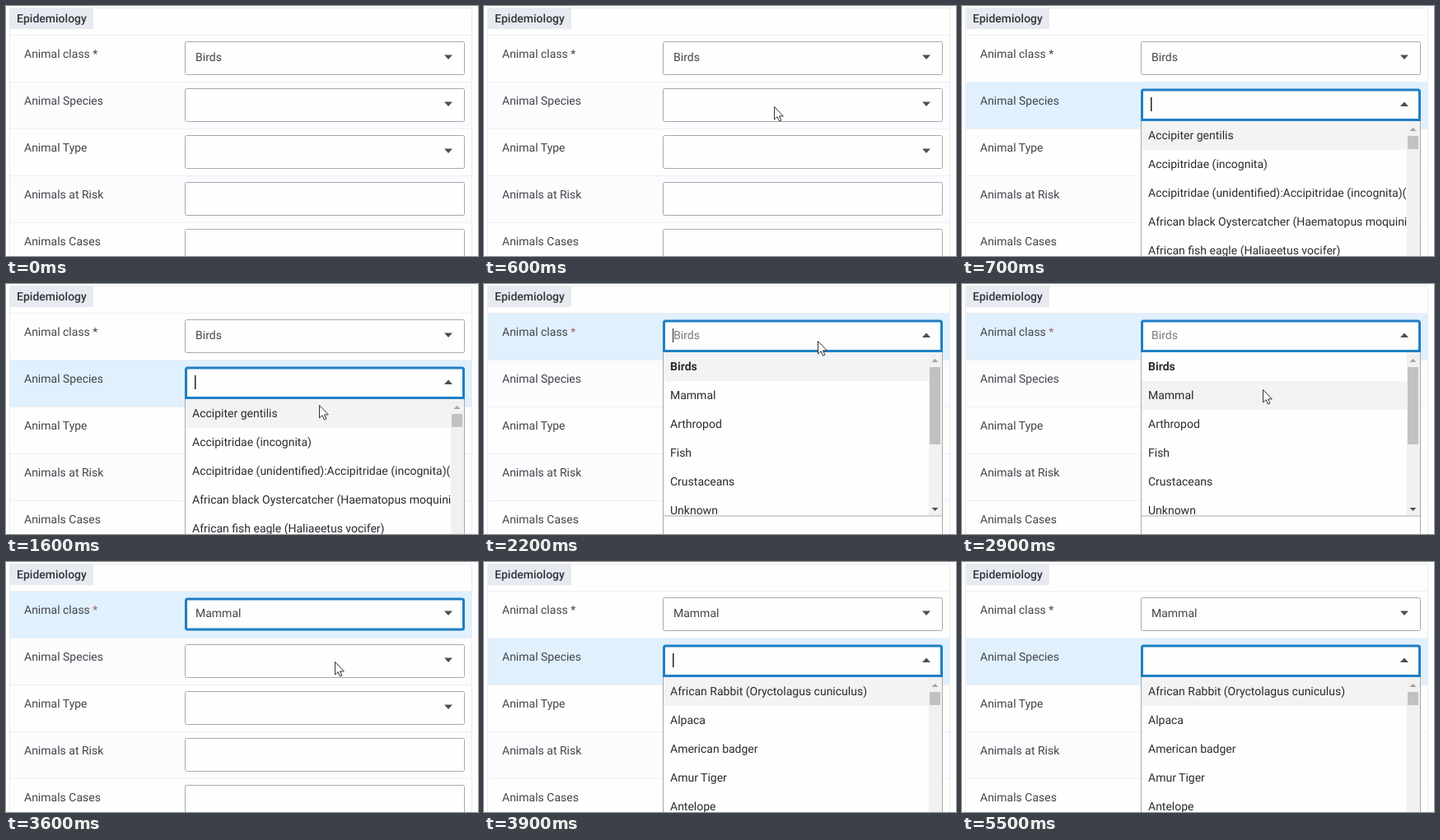
An HTML page that plays this animation: 573x304 px, repeating every 5600 ms.

```html
<!DOCTYPE html>
<html lang="en">
<head>
<meta charset="utf-8">
<title>Epidemiology form</title>
<style>
  html, body { margin: 0; width: 100%; height: 100%; overflow: hidden; background: #fefefe; }
  svg { display: block; width: 573px; height: 304px; font: 14px Roboto, sans-serif; fill: #434449;
    text-rendering: geometricPrecision; }
</style>
</head>
<body>
<svg id="stage" viewBox="0 0 573 304"></svg>
<script>
const LOOP = 5600, STEP = 100;
const ROW_TOP = 35, ROW_HEIGHT = 57, OPTION_HEIGHT = 35;
const LABELS = ['Animal class', 'Animal Species', 'Animal Type', 'Animals at Risk', 'Animals Cases'];
const CLASSES = ['Birds', 'Mammal', 'Arthropod', 'Fish', 'Crustaceans', 'Unknown'];
const BIRDS = ['Accipiter gentilis', 'Accipitridae (incognita)',
  'Accipitridae (unidentified):Accipitridae (incognita)(unidentified)',
  'African black Oystercatcher (Haematopus moquini)', 'African fish eagle (Haliaeetus vocifer)'];
const MAMMALS = ['African Rabbit (Oryctolagus cuniculus)', 'Alpaca', 'American badger', 'Amur Tiger', 'Antelope'];

// Form states: start time, focused row, open list, caret blink times
const STATES = [
  { at: 0, value: 'Birds', focus: -1 },
  { at: 700, value: 'Birds', focus: 1, options: BIRDS, blinks: [1100, 1600] },
  { at: 2200, value: 'Birds', focus: 0, options: CLASSES, blinks: [2700] },
  { at: 3100, value: 'Mammal', focus: 0 },
  { at: 3900, value: 'Mammal', focus: 1, options: MAMMALS, blinks: [4400, 4900, 5500] }
];

// Pointer strokes as [time, x, y] points; the pointer is hidden between strokes
const STROKES = [
  [[100, 300, 250], [600, 352, 122], [700, 352, 122]],
  [[1300, 376, 141], [1400, 380, 147], [1800, 380, 147]],
  [[1900, 396, 96], [2000, 404, 72], [2200, 405, 69], [2300, 405, 67], [2400, 403, 70],
   [2500, 403, 70], [2900, 365, 128], [3000, 365, 128], [3600, 399, 121], [3900, 399, 121]]
];

const rect = (x, y, w, h, fill, extra = '') =>
  `<rect x="${x}" y="${y}" width="${w}" height="${h}" fill="${fill}" ${extra}/>`;
const text = (x, y, content, extra = '') => `<text x="${x}" y="${y}" ${extra}>${content}</text>`;
const triangle = (x, y, w, h, fill) =>
  `<path d="M${x - w} ${y - h}H${x + w}L${x} ${y + h}Z" fill="${fill}"/>`;
const rowTop = i => ROW_TOP + i * ROW_HEIGHT;

function pointerAt(time) {
  const stroke = STROKES.find(s => time >= s[0][0] && time < s.at(-1)[0]);
  if (!stroke) return null;
  const i = stroke.findIndex(p => p[0] > time);
  const [t0, x0, y0] = stroke[i - 1], [t1, x1, y1] = stroke[i];
  const u = (time - t0) / (t1 - t0), eased = u * u * (3 - 2 * u);
  return { x: Math.round(x0 + (x1 - x0) * eased), y: Math.round(y0 + (y1 - y0) * eased) };
}

function row(i, state) {
  const top = rowTop(i), focused = i === state.focus, open = focused && state.options;
  let out = rect(5, top, 560, ROW_HEIGHT, focused ? '#e0f0fd' : i % 2 ? '#fcfbfe' : '#fefefe');
  out += rect(5, top, 560, 1, '#f0eef3');
  const star = i ? '' : ` <tspan fill="${focused ? '#a4665e' : '#434449'}">*</tspan>`;
  out += text(22, top + 28, LABELS[i] + star);
  out += focused
    ? rect(218.5, top + 10, 337, 37, '#fefefe', 'stroke="#1f7fc3" stroke-width="3" rx="2"')
    : rect(217.5, top + 8.5, 339, 40, '#fefefe', 'stroke="#a6a8af" rx="2"');
  if (i === 0) out += text(230, top + 32, state.value, open ? 'fill="#77787b"' : '');
  if (i < 3) out += triangle(537, top + 27.2, 5, open ? -2.8 : 2.8, '#48524f');
  return out;
}

function dropdown({ focus, options }, pointer) {
  const top = rowTop(focus) + 48, isClass = focus === 0, height = isClass ? 199 : 250;
  const hovered = pointer && pointer.y >= top ? Math.floor((pointer.y - top) / OPTION_HEIGHT) : 0;
  let out = `<clipPath id="list">${rect(218, top, 322, height, '#000')}</clipPath>`;
  out += rect(217.5, top - 0.5, 339, height + 0.5, '#fefefe', 'stroke="#a8a8ad"');
  out += '<g clip-path="url(#list)" fill="#2a2b2e">';
  options.forEach((name, i) => {
    const y = top + i * OPTION_HEIGHT;
    if (i === hovered) out += rect(218, y, 322, OPTION_HEIGHT, '#f2f3f4');
    out += text(226, y + 22, name, isClass && i === 0 ? 'font-weight="700"' : '');
  });
  out += '</g>' + rect(540, top, 16, height - 1, '#f1f1f1');
  out += rect(541, top + 18, 13, isClass ? 94 : 16, '#c1c1c1');
  out += triangle(547.5, top + 10, 4, -2, '#a3a3a3');
  if (isClass) out += triangle(547.5, top + 191, 4, 2, '#505050');
  // The focus ring stays above the list's top edge
  return out + rect(217, top - 3, 340, 3, '#1f7fc3');
}

function draw(time) {
  const state = STATES.findLast(s => time >= s.at), pointer = pointerAt(time);
  let out = rect(4.5, 2.5, 561, 320, '#fefefe', 'stroke="#ebebef"');
  out += rect(5, 3, 101, 25, '#e8eaf1') + text(13, 20, 'Epidemiology', 'font-weight="500" fill="#34353b"');
  out += LABELS.map((_, i) => row(i, state)).join('');
  if (state.options) {
    out += dropdown(state, pointer);
    const visible = state.blinks.filter(t => time >= t).length % 2 === 0;
    if (visible) out += rect(229, rowTop(state.focus) + 19, state.focus ? 1.5 : 1, 17, '#222');
  }
  if (pointer) {
    out += `<path transform="translate(${pointer.x + 0.5} ${pointer.y + 0.5})" fill="#fff" stroke="#333"
      d="M0 0V15.5L3.6 12.2 6 17.6 8.3 16.6 6 11.4H10.8Z"/>`;
  }
  return out;
}

const stage = document.getElementById('stage');
let lastTime = -1;
function tick() {
  const time = Math.floor(performance.now() % LOOP / STEP) * STEP;
  if (time !== lastTime) stage.innerHTML = draw(lastTime = time);
  requestAnimationFrame(tick);
}
tick();
</script>
</body>
</html>
```
